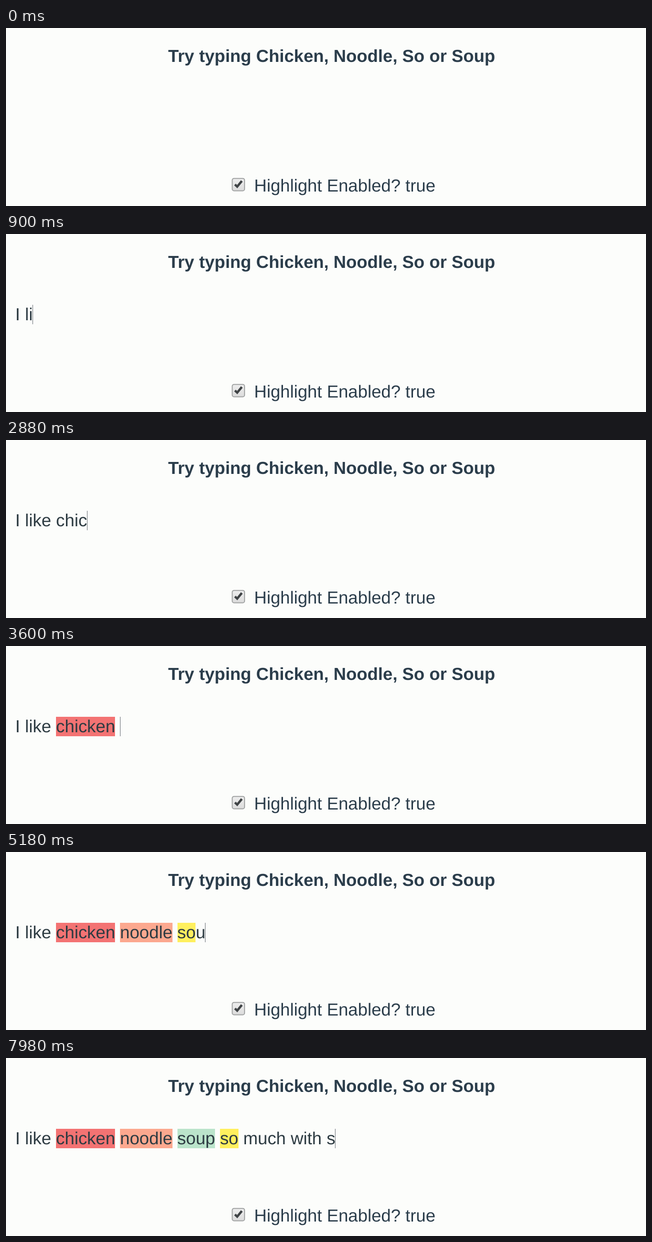
Write an HTML page that moves like this. It is 1280 by 357 pixels and loops after 8000 ms.

```html
<!DOCTYPE html>
<html lang="en">
<head>
<meta charset="utf-8">
<title>Highlighted input</title>
<style>
  html, body { margin: 0; width: 1280px; height: 357px; overflow: hidden; background: #fcfdfb; }
  body {
    position: relative;
    font: 34.9px/39px "Liberation Sans", Arial, sans-serif;
    color: #2b3d4b;
    text-rendering: geometricPrecision;
  }
  div, svg { position: absolute; white-space: pre; }
  #title { left: 324.2px; top: 37px; font-size: 34.85px; font-weight: bold; }
  #input { left: 18.6px; top: 142px; color: #2d3b42; }
  #label { left: 496.2px; top: 297px; }
  #caret { top: 142px; width: 1px; height: 39px; background: #6c7378; }
  #box { left: 451px; top: 300px; }
</style>
</head>
<body>
<div id="title">Try typing Chicken, Noodle, So or Soup</div>
<div id="input"></div>
<div id="caret"></div>
<svg id="box" width="28" height="28">
  <defs>
    <linearGradient id="face" x2="0" y2="1">
      <stop stop-color="#eeeeee"/>
      <stop offset="1" stop-color="#dcdcdc"/>
    </linearGradient>
  </defs>
  <rect x="1.5" y="1.8" width="24.6" height="24.6" rx="3.5" fill="url(#face)" stroke="#a3a5a5" stroke-width="2"/>
  <path d="M6.9 13.8 11.4 18.2 20.7 6.8" fill="none" stroke="#3f4345" stroke-width="4.6"/>
</svg>
<div id="label">Highlight Enabled? true</div>
<script>
const LOOP = 8000;
const BLINK = 530;

// Keys within a phrase are evenly spaced from its start to its end.
const PHRASES = [
  { text: "I like ", from: 470, to: 1320 },
  { text: "chi", from: 2050, to: 2350 },
  { text: "cken ", from: 2880, to: 3600 },
  { text: "noodle ", from: 3830, to: 4650 },
  { text: "sou", from: 4950, to: 5180 },
  { text: "p so", from: 5400, to: 5920 },
  { text: " muc", from: 6030, to: 6650 },
  { text: "h ", from: 6720, to: 6870 },
  { text: "with s", from: 7370, to: 7980 }
];
const COLORS = { chicken: "#f37373", noodle: "#fca88f", soup: "#bbe4cb", so: "#fff05e" };

const input = document.getElementById("input");
const caret = document.getElementById("caret");
const words = new RegExp(Object.keys(COLORS).join("|"), "g");
const mark = word => `<span style="background:${COLORS[word]}">${word}</span>`;

const keys = PHRASES.flatMap(({ text, from, to }) =>
  [...text].map((char, i) => ({ char, at: from + (to - from) * i / (text.length - 1) })));

let shown = -1;

function draw(time) {
  const typed = keys.filter(key => key.at <= time);
  if (typed.length !== shown) {
    shown = typed.length;
    input.innerHTML = typed.map(key => key.char).join("").replace(words, mark);
    caret.style.left = Math.round(18.2 + input.getBoundingClientRect().width) + "px";
  }
  const visible = shown && time - typed[shown - 1].at < BLINK;
  caret.style.visibility = visible ? "visible" : "hidden";
}

const start = performance.now();
function tick() {
  draw((performance.now() - start) % LOOP);
  requestAnimationFrame(tick);
}
draw(0);
requestAnimationFrame(tick);
</script>
</body>
</html>
```
